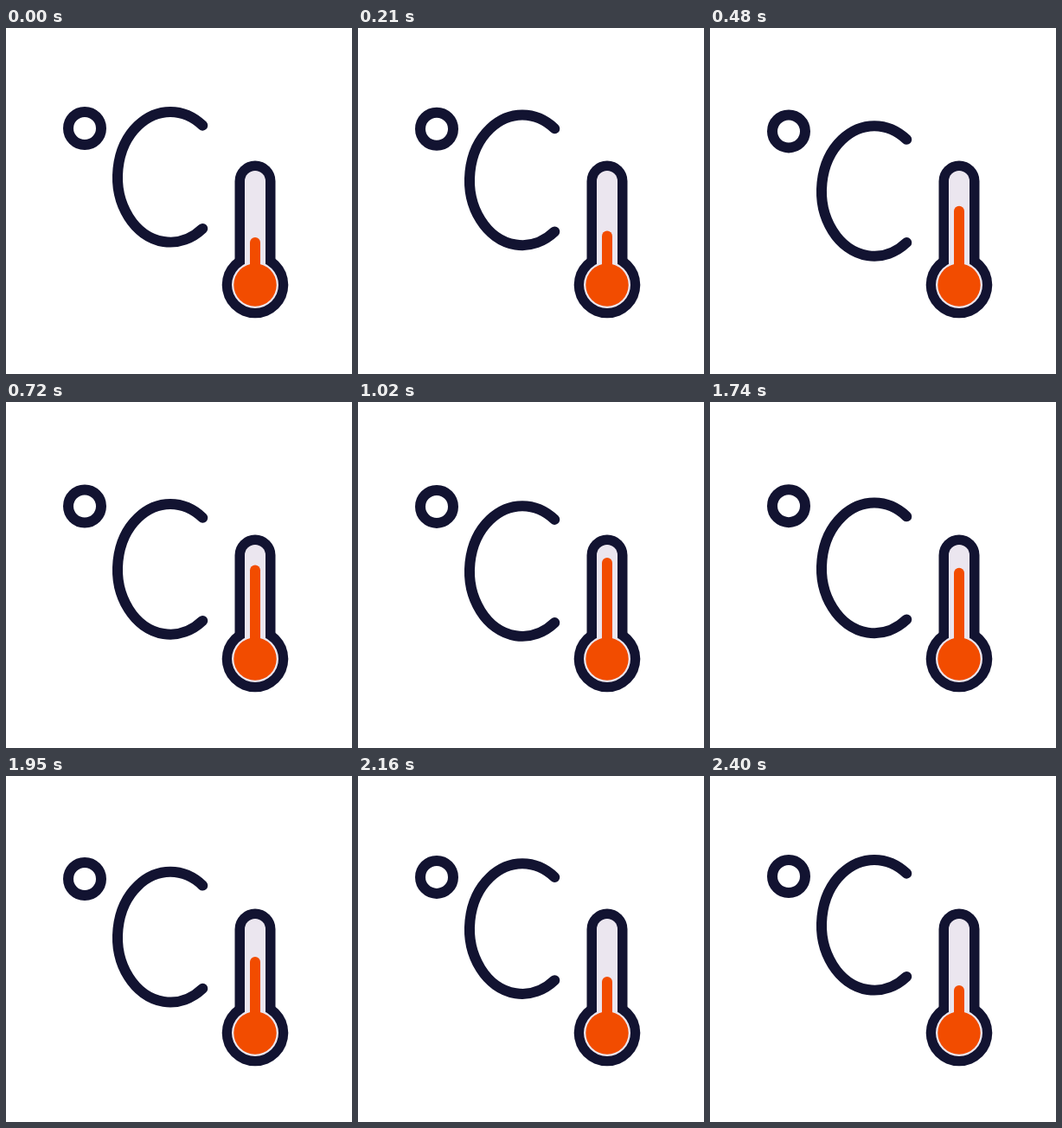
Recreate the animation shown at these times as an HTML page with a canvas. Size 400 by 400 pixels, loop 2.43 s.

```html
<!DOCTYPE html>
<html lang="en">
<head>
<meta charset="utf-8">
<title>Celsius thermometer</title>
<style>
  html, body { margin: 0; width: 100%; height: 100%; overflow: hidden; background: #fff; }
  canvas { display: block; width: 400px; height: 400px; }
</style>
</head>
<body>
<canvas id="stage" width="400" height="400"></canvas>
<script>
const ctx = document.getElementById('stage').getContext('2d');
const NAVY = '#121331', PALE = '#ebe6ef', ORANGE = '#f24c00';
const STEP = 30, LOOP = 2430, HALF = 1200;

// Cubic ease through (x1, 0) and (x2, 1), solved by bisection.
function ease(x, x1, x2) {
  let lo = 0, hi = 1;
  for (let i = 0; i < 24; i++) {
    const s = (lo + hi) / 2, r = 1 - s;
    if (3 * r * r * s * x1 + 3 * r * s * s * x2 + s ** 3 < x) lo = s;
    else hi = s;
  }
  return lo * lo * (3 - 2 * lo);
}

// Goes 0 to 1 and back, settling slowly around the peak.
function swing(time, riseEnd, fallEnd) {
  return time <= HALF
    ? ease(time / HALF, 0.333, riseEnd)
    : ease(Math.max(0, 2 * HALF - time) / HALF, 0.333, fallEnd);
}

function stroke(color, width, path) {
  ctx.beginPath();
  path();
  ctx.strokeStyle = color;
  ctx.lineWidth = width;
  ctx.lineCap = 'round';
  ctx.stroke();
}

function disc(color, x, y, radius) {
  ctx.beginPath();
  ctx.arc(x, y, radius, 0, Math.PI * 2);
  ctx.fillStyle = color;
  ctx.fill();
}

function bar(color, x, top, bottom, width) {
  stroke(color, width, () => {
    ctx.moveTo(x, top + width / 2);
    ctx.lineTo(x, bottom);
  });
}

function draw(time) {
  ctx.fillStyle = '#fff';
  ctx.fillRect(0, 0, 400, 400);

  const drop = swing(time, 0.15, 0.22);
  const level = swing(time, 0.3, 0.3);

  stroke(NAVY, 12, () => ctx.arc(91, 116 + 5 * drop, 19, 0, Math.PI * 2));
  stroke(NAVY, 12, () =>
    ctx.ellipse(190, 172.3 + 23.5 * drop, 61, 75.3, 0, 0.913, Math.PI * 2 - 0.913));

  const x = 288, y = 297;
  bar(NAVY, x, 153.5, y - 20, 47);
  disc(NAVY, x, y, 38.3);
  bar(PALE, x, 165, y, 24);
  disc(PALE, x, y, 27);
  bar(ORANGE, x, 242 - 63 * level, y, 12);
  disc(ORANGE, x, y, 24.7);
}

function tick() {
  const time = performance.now() % LOOP;
  draw(Math.floor(time / STEP) * STEP);
  requestAnimationFrame(tick);
}
tick();
</script>
</body>
</html>
```
